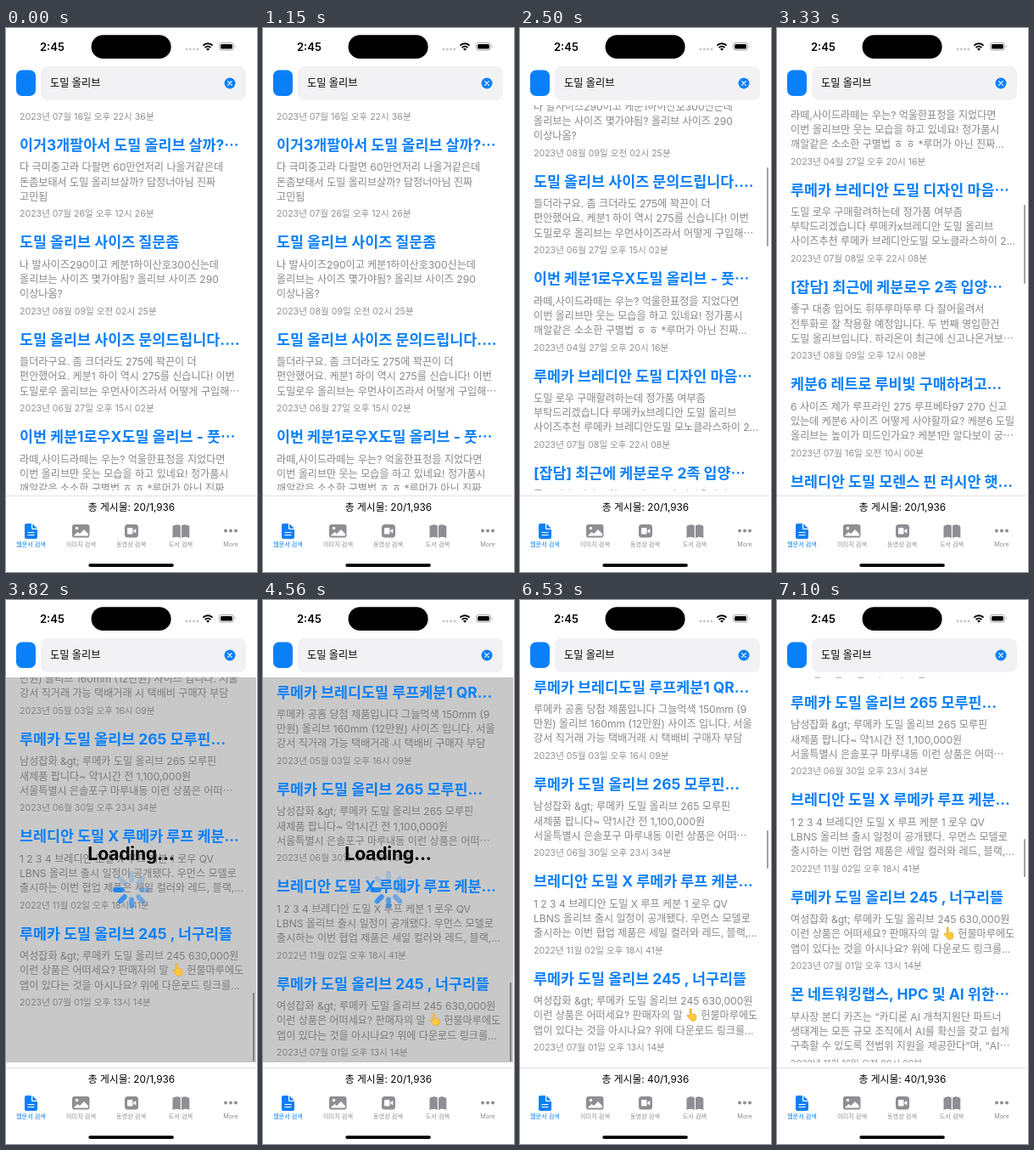
An HTML page that plays this animation: 296x640 px, repeating every 8000 ms.

```html
<!DOCTYPE html>
<html lang="ko">
<head>
<meta charset="utf-8">
<style>
  html, body { margin: 0; width: 100%; height: 100%; overflow: hidden; background: #fff; }
  body { position: relative; font-family: Inter, "Noto Sans CJK KR", sans-serif; white-space: pre; }
  body > svg, .abs, .row, .row > * { position: absolute; }
  body > svg { left: 0; top: 0; }
  #view { left: 0; top: 91px; width: 295px; height: 453px; overflow: hidden; color: #88888a; }
  #list { left: 16px; top: 0; }
  .title { top: -12px; font: 700 17.4px/24px Inter, "Noto Sans CJK KR", sans-serif; color: #0a80f8; }
  .text { top: 17.4px; font-size: 12.1px; line-height: 17.2px; }
  .date { top: 74.4px; font-size: 10.6px; line-height: 14px; color: #929295; }
  #view.loading { background: #c8c8c8; color: #7b7b7d; }
  #view.loading .date { color: #828285; }
  .hand { width: 15px; height: 16px; vertical-align: -3px; }
  #thumb { left: 290.5px; width: 2.5px; border-radius: 2px; background: #000; }
  #busy { left: 0; top: 0; width: 295px; height: 453px; }
  #busy b { left: 0; width: 295px; top: 193px; text-align: center; color: #000; font-size: 21.2px; line-height: 28px; letter-spacing: -.01em; }
  #spinner { left: 122.5px; top: 225px; }
  #count { left: 0; width: 296px; top: 555px; text-align: center; font-size: 11.8px; line-height: 18px; }
  .tab { top: 603px; width: 60px; text-align: center; font-size: 7.2px; line-height: 10px; color: #8e8e93; }
  .tab.on { color: #0a80f8; font-weight: 500; }
</style>
</head>
<body>
<div id="view" class="abs">
  <div id="list" class="abs"></div>
  <div id="thumb" class="abs"></div>
  <div id="busy" class="abs"><b class="abs">Loading...</b><svg id="spinner" class="abs" width="50" height="50" viewBox="-25 -25 50 50"></svg></div>
</div>
<svg width="296" height="640">
  <rect x="100.6" y="8.3" width="94" height="27.8" rx="13.9"/>
  <g fill="#c4c4c6"><circle cx="213" cy="25" r="1.4"/><circle cx="217.3" cy="25" r="1.4"/><circle cx="221.6" cy="25" r="1.4"/><circle cx="225.9" cy="25" r="1.4"/></g>
  <path d="M232.4 20.6a8 8 0 0 1 11.2 0M234.6 23a5 5 0 0 1 6.8 0" fill="none" stroke="#000" stroke-width="1.9"/>
  <path d="M236 24.7a2.8 2.8 0 0 1 4 0l-2 2z"/>
  <rect x="251.5" y="17.5" width="17" height="8.5" rx="2.6" fill="none" stroke="#a5a5a5"/>
  <rect x="253" y="19" width="14" height="5.5" rx="1.5"/>
  <path d="M270 20.3q1.8 1.5 0 3z" fill="#a5a5a5"/>
  <rect x="12" y="49.5" width="23" height="30.5" rx="7" fill="#0a80f8"/>
  <rect x="41" y="45" width="242" height="40" rx="8" fill="#f2f2f5"/>
  <circle cx="264" cy="65" r="6.5" fill="#0a80f8"/>
  <path d="M261.7 62.7l4.6 4.6m0-4.6l-4.6 4.6" stroke="#fff" stroke-width="1.2" stroke-linecap="round"/>
  <path d="M0 550.5H295" stroke="#e2e2e4"/>
  <path d="M24 583h6v5.5q0 1.5 1.5 1.5H37v9q0 2-2 2H24q-2 0-2-2V585q0-2 2-2zM31.3 583.3L36.7 588.7H32q-.7 0-.7-.7z" fill="#0a80f8"/>
  <path d="M25.5 593.5h8m-8 3h8" stroke="#fff" stroke-width="1.1"/>
  <g fill="#8e8e93">
    <rect x="78" y="584" width="20.5" height="15.5" rx="2.8"/>
    <rect x="140" y="584" width="16" height="15.5" rx="3.5"/>
    <path d="M196.5 586q5-3.4 9.3-.5V600q-4.3-2.6-9.3 0zM207 585.5q4.3-2.9 9.3.5v14q-5-2.6-9.3 0z"/>
    <circle cx="259" cy="591.5" r="2"/><circle cx="265" cy="591.5" r="2"/><circle cx="271" cy="591.5" r="2"/>
  </g>
  <g fill="#fff"><circle cx="83.5" cy="588.5" r="1.7"/><path d="M80 597l4.5-4 2.5 2 5-5 5 5v2.5H80zM143 589q0-1 1-1h4.5q1 0 1 1v5.5q0 1-1 1H144q-1 0-1-1zM150.3 591l3-2v5.5l-3-2z"/></g>
  <rect x="97.3" y="630.2" width="100.6" height="3.8" rx="1.9"/>
</svg>
<div class="abs" style="left:40px;top:14px;font:600 13px/16px Inter,sans-serif">2:45</div>
<div class="abs" style="left:52px;top:56px;font-size:12.2px;line-height:18px">도밀 올리브</div>
<div id="count" class="abs"></div>
<script>
const $ = id => document.getElementById(id);
const HAND = '<svg class="hand" viewBox="0 0 15 16"><path d="M5 1.300q1.300-1.300 2.400 0V7h3.200q2.400 0 2.400 2.500v2q0 4-4 4-2.800 0-4.300-3L2 9.300q-.3-1.600 1.300-1.200L5 9.300z" fill="#ffc83d" stroke="#d99a20" stroke-width=".5"/></svg>';

// Each row: title, body lines, date
const rows = [
  ['', '', '2023년 07월 16일 오후 22시 36분'],
  ['이거3개팔아서 도밀 올리브 살까?⋯', '다 극미중고라 다팔면 60만언저리 나올거같은데\n돈좀보태서 도밀 올리브살까? 답정너아님 진짜\n고민됨', '2023년 07월 26일 오후 12시 26분'],
  ['도밀 올리브 사이즈 질문좀', '나 발사이즈290이고 케분1하이산호300신는데\n올리브는 사이즈 몇가야됨? 올리브 사이즈 290\n이상나옴?', '2023년 08월 09일 오전 02시 25분'],
  ['도밀 올리브 사이즈 문의드립니다....', '들더라구요. 좀 크더라도 275에 꽉끈이 더\n편안했어요. 케분1 하이 역시 275를 신습니다! 이번\n도밀로우 올리브는 우먼사이즈라서 어떻게 구입해⋯', '2023년 06월 27일 오후 15시 02분'],
  ['이번 케분1로우X도밀 올리브 - 풋⋯', '라떼,사이드라떼는 우는? 억울한표정을 지었다면\n이번 올리브만 웃는 모습을 하고 있네요! 정가품시\n깨알같은 소소한 구별법 ㅎ ㅎ *루머가 아닌 진짜...', '2023년 04월 27일 오후 20시 16분'],
  ['루메카 브레디안 도밀 디자인 마음⋯', '도밀 로우 구매할려하는데 정가품 여부좀\n부탁드리겠습니다 루메카x브레디안 도밀 올리브\n사이즈추천 루메카 브레디안도밀 모노클라스하이 2...', '2023년 07월 08일 오후 22시 08분'],
  ['[잡담] 최근에 케분로우 2족 입양⋯', '좋구 대충 입어도 휘뚜루마뚜루 다 잘어울려서\n전투화로 잘 착용할 예정입니다. 두 번째 영입한건\n도밀 올리브입니다. 하리온이 최근에 신고나온거보⋯', '2023년 08월 09일 오후 12시 08분'],
  ['케분6 레트로 루비빛 구매하려고...', '6 사이즈 제가 루프라인 275 루프베타97 270 신고\n있는데 케분6 사이즈 어떻게 사야할까요? 케분6 도밀\n올리브는 높이가 미드인가요? 케분1만 알다보이 궁⋯', '2023년 07월 16일 오전 10시 00분'],
  ['브레디안 도밀 모렌스 핀 러시안 햇...', '이번에 나온 모자 실물이 궁금해서 올려봅니다\n올리브 색상이랑 같이 쓰면 잘 어울릴까요?\n사이즈는 보통으로 주문했습니다', '2023년 07월 11일 오후 19시 20분'],
  ['루메카 브레디도밀 루프케분1 QR...', '루메카 공홈 당첨 제품입니다 그늘먹색 150mm (9\n만원) 올리브 160mm (12만원) 사이즈 입니다. 서울\n강서 직거래 가능 택배거래 시 택배비 구매자 부담', '2023년 05월 03일 오후 16시 09분'],
  ['루메카 도밀 올리브 265 모루핀...', '남성잡화 &amp;gt; 루메카 도밀 올리브 265 모루핀\n새제품 팝니다~ 약1시간 전 1,100,000원\n서울특별시 은솔포구 마루내동 이런 상품은 어떠⋯', '2023년 06월 30일 오후 23시 34분'],
  ['브레디안 도밀 X 루메카 루프 케분...', '1 2 3 4 브레디안 도밀 X 루프 케분 1 로우 QV\nLBNS 올리브 출시 일정이 공개됐다. 우먼스 모델로\n출시하는 이번 협업 제품은 세일 컬러와 레드, 블랙,...', '2022년 11월 02일 오후 18시 41분'],
  ['루메카 도밀 올리브 245 , 너구리뜰', `여성잡화 &amp;gt; 루메카 도밀 올리브 245 630,000원\n이런 상품은 어떠세요? 판매자의 말 ${HAND} 헌물마루에도\n앱이 있다는 것을 아시나요? 위에 다운로드 링크를...`, '2023년 07월 01일 오후 13시 14분'],
  ['몬 네트워킹랩스, HPC 및 AI 위한⋯', '부사장 본디 카즈는 “카디론 AI 개척지원단 파트너\n생태계는 모든 규모 조직에서 AI를 확신을 갖고 쉽게\n구축할 수 있도록 전범위 지원을 제공한다”며, “AI⋯', '2022년 11월 16일 오전 09시 00분'],
];
rows.splice(9, 0, ...rows.slice(2, 8)); // similar posts pass by during the fast flick

const PITCH = 114.4, FIRST = 138 - 91 - PITCH;
$('list').innerHTML = rows.map(([title, text, date], i) =>
  `<div class="row" style="top:${FIRST + i * PITCH}px"><div class="title">${title}</div><div class="text">${text}</div><div class="date">${date}</div></div>`).join('');
const nextPage = $('list').lastChild;

['웹문서 검색', '이미지 검색', '동영상 검색', '도서 검색', 'More'].forEach((label, i) =>
  document.body.insertAdjacentHTML('beforeend',
    `<div class="abs tab${i ? '' : ' on'}" style="left:${[29.5, 88.5, 147.5, 206, 265][i] - 30}px">${label}</div>`));

$('spinner').innerHTML = Array.from({ length: 8 }, (_, i) =>
  `<path d="M0-11.5V-19" stroke="#0a80f8" stroke-width="5.8" stroke-linecap="round" transform="rotate(${i * 45})"/>`).join('');
const spokes = [...$('spinner').children];

// The screen refreshes only at these moments
const STAMPS = [0, 1150, 1390, 1480, 1590, 1710, 1830, 1950, 2080, 2240, 2380, 2500, 2620, 2740, 2850,
  2970, 3090, 3210, 3330, 3450, 3560, 3670, 3820, 3925, 4030, 4210, 4390, 4560, 4710, 4820, 4930, 5040,
  5220, 5370, 5470, 5570, 5670, 5780, 5900, 6420, 6540, 6650, 6760, 6880, 6990, 7100];

// Drags, a hard flick with a bounce at the end, then one more drag
const SCROLL = [[0, 0], [1300, 0], [1390, 5], [1710, 59], [2080, 136], [2380, 166], [2500, 186.5], [2850, 310],
  [3210, 385], [3330, 405], [3450, 800], [3560, 1230], [3670, 1560], [3820, 1690], [4030, 1668],
  [4210, 1643], [4390, 1634], [4560, 1631.5], [6300, 1631.5], [6420, 1637], [6760, 1695], [7100, 1733]];

function scrollAt(t) {
  const i = SCROLL.findIndex(p => p[0] > t);
  if (i < 0) return SCROLL.at(-1)[1];
  const [t0, a] = SCROLL[i - 1], [t1, b] = SCROLL[i];
  return a + (b - a) * (t - t0) / (t1 - t0);
}

function draw() {
  const now = performance.now() % 8000;
  const t = STAMPS.findLast(s => s <= now);
  const scroll = scrollAt(t), loaded = t >= 5900, loading = t >= 3670 && !loaded;

  $('list').style.transform = `translateY(${-scroll}px)`;
  nextPage.style.display = loaded ? '' : 'none';
  $('view').classList.toggle('loading', loading);
  $('busy').style.display = loading ? '' : 'none';
  $('count').textContent = `총 게시물: ${loaded ? 40 : 20}/1,936`;

  const top = (scroll + 189) * (loaded ? .0992 : .198) - 1;
  const fade = loaded ? +(t >= 6420) : Math.min(1, Math.max(0, (5900 - t) / 400));
  $('thumb').style.top = top + 'px';
  $('thumb').style.height = Math.min(loaded ? 45 : 93, 452 - top) + 'px';
  $('thumb').style.opacity = t < 1390 ? 0 : .36 * fade;

  const lead = Math.floor(t / 94) + 6;
  spokes.forEach((s, i) => s.setAttribute('opacity', Math.max(.2, .85 - .13 * ((lead - i) % 8))));
  requestAnimationFrame(draw);
}
draw();
</script>
</body>
</html>
```
